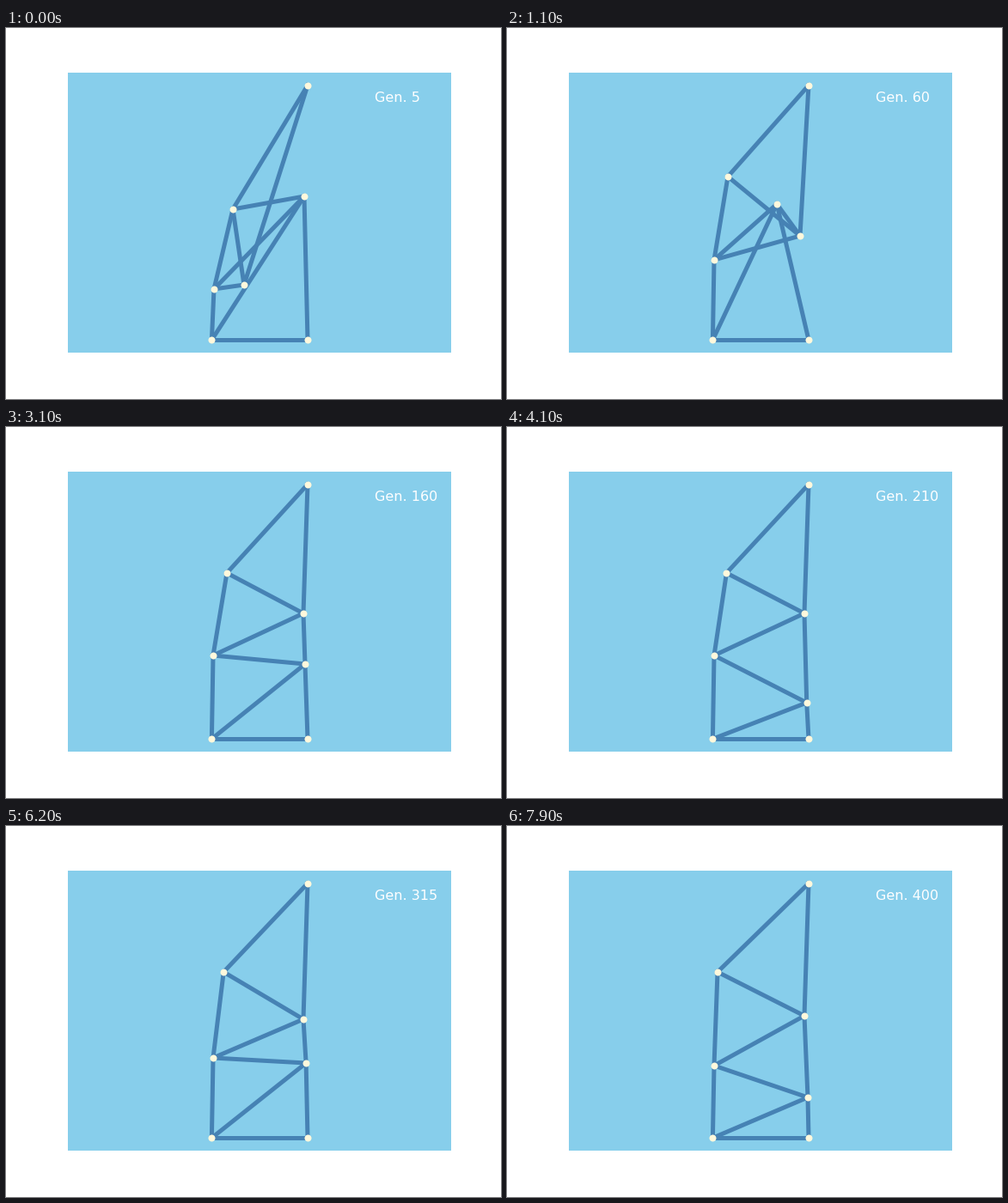
Write a matplotlib script that moves like this. It is 576 by 432 pixels and loops after 8 s.

```python
import random

import matplotlib.pyplot as plt
from matplotlib.animation import FuncAnimation
from matplotlib.patches import Rectangle

W, H, DPI = 576, 432, 72
FRAMES, STEP_MS, GEN_STEP = 80, 100, 5

BASE = [(351, 363.2), (239.4, 363.2)]
TIP = (351, 66.8)
LEFT = 241


def tower(p, right1, left1, right2):
    """Settled shape: free joints at the given heights, p = progress 0..1."""
    return [(348 + 2 * p, right1), (LEFT, left1),
            (346, right2), (257 - 12 * p * p, 170)]


# Free joints zigzag upwards: right 1, left 1, right 2, left 2
POSES = {
    0: [(347, 196), (242, 304), (264, 211), (277, 299)],
    11: [(314, 205), (LEFT, 270), (341, 242), (257, 173)],
    20: tower(0, 276, 276, 242),
    41: tower(0.36, 321, 266, 217),
    53: tower(0.56, 276, 215, 227),
    71: tower(0.86, 316, 270, 227),
    79: tower(1, 316, 279, 221),
}


def evolve(seed=5):
    """Joints jump one by one to the next pose, with short-lived mutations."""
    rng = random.Random(seed)
    steps = sorted(POSES)
    out = []
    for a, b in zip(steps, steps[1:]):
        jumps = [rng.randint(a + 1, b) for _ in POSES[a]]
        for k in range(a, b):
            joints = [new if k >= j else old
                      for old, new, j in zip(POSES[a], POSES[b], jumps)]
            if k > a and rng.random() < 0.3:
                i = rng.randrange(4)
                x, y = joints[i]
                joints[i] = (x, y + rng.randint(-10, 10))
            out.append(joints)
    return out + [POSES[steps[-1]]]


history = evolve()

fig = plt.figure(figsize=(W / DPI, H / DPI), dpi=DPI, facecolor="white")
ax = fig.add_axes([0, 0, 1, 1])
ax.set_xlim(0, W)
ax.set_ylim(H, 0)
ax.axis("off")
ax.add_patch(Rectangle((72, 52), 446, 326, color="skyblue", lw=0))

# A strip of triangles: each joint ties to the next two
bars = [(i, i + d) for d in (1, 2) for i in range(7 - d)]
lines = [ax.plot([], [], color="steelblue", lw=5, zorder=2)[0] for _ in bars]
dots, = ax.plot([], [], "o", color="cornsilk", ms=8, mew=0, zorder=3)
label = ax.text(429.1, 86, "", color="white", fontsize=16,
                family="DejaVu Sans", va="baseline", zorder=4)


def update(k):
    pts = [*BASE, *history[k], TIP]
    for line, (i, j) in zip(lines, bars):
        line.set_data(*zip(pts[i], pts[j]))
    dots.set_data(*zip(*pts))
    label.set_text(f"Gen. {GEN_STEP * (k + 1)}")
    return [*lines, dots, label]


anim = FuncAnimation(fig, update, frames=FRAMES, interval=STEP_MS,
                     repeat=True, repeat_delay=0)
plt.show()
```
